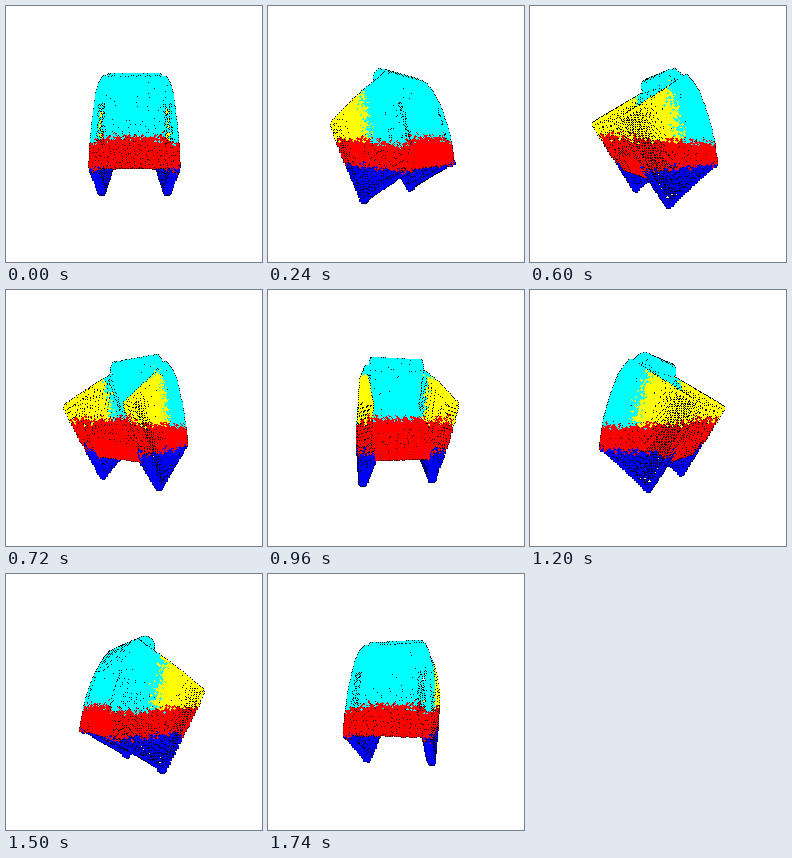
Write a matplotlib script that moves like this. It is 256 px wide and 256 px high and loops after 1.8 s.

```python
import numpy as np
import matplotlib.pyplot as plt
from matplotlib.animation import FuncAnimation

SIZE, FRAMES, INTERVAL = 256, 30, 60
CAMERA = 240
PITCH = np.radians(32)
TOP = 85
CYAN, YELLOW, RED, BLUE = (0, 255, 255), (255, 255, 0), (255, 0, 0), (0, 0, 255)
rng = np.random.default_rng(4)


# Chair space: x across, h up from the base, b backwards from the front plane.
def shell(h):
    """Backrest depth at height h."""
    return 63 + 0.5 * h - 0.0033 * h**2


def outer(h, b):
    """Half width of the body, narrowing at the shoulders."""
    flare = 3 * np.minimum(h / 60, 1) * (1 - b / 40)
    shoulder = np.clip((h - 66) / 19, 0, 1)**1.5 * np.clip((b - 45) / 33, 0, 1)
    return 37 + flare - 5 * shoulder


def inner(h):
    """Inside face of a side panel."""
    return np.where(h < 46, np.maximum(31 - 0.23 * h, 24), 30)


def patch(n, surface, mirror=False):
    """Spread n points evenly over a surface of (u, v)."""
    i = np.arange(n)
    u = (rng.random() + 0.7548777 * i) % 1
    v = (rng.random() + 0.5698403 * i) % 1
    pts = np.stack(np.broadcast_arrays(*surface(u, v)), 1).astype(float)
    if mirror:
        pts = np.vstack([pts, pts * (-1, 1, 1)])
    return pts


def side(u, v):
    h = TOP * v**0.78
    b = shell(h) * u**0.68
    return outer(h, b), h, b


def inside(u, v):
    h = (TOP - 1) * v**0.85
    return inner(h), h, 57 * u


def rim(h, b, u):
    near, far = np.minimum(inner(h), outer(h, b) - 3), outer(h, b)
    return near + (far - near) * u, h, b


def back(u, v):
    h = TOP * v
    return outer(h, shell(h)) * (2 * u - 1), h, shell(h)


def roll(u, v):
    a = 2 * np.pi * v
    return 50 * u - 25, 87.5 + 9 * np.sin(a), 70 + 8.5 * np.cos(a)


def roll_end(u, v):
    a, r = 2 * np.pi * v, np.sqrt(u)
    return 25 + 0 * u, 87.5 + 9 * r * np.sin(a), 70 + 8.5 * r * np.cos(a)


def foot(b):
    def ring(u, v):
        a = 2 * np.pi * u
        return 34 + 2.5 * np.cos(a), -2 * v, b + 2.5 * np.sin(a)
    return ring


def build():
    rear = patch(3000, back)
    x, h = np.abs(rear[:, 0]), rear[:, 1]
    slit = (x > 25.5) & (x < 32) & (h > 18) & (h < 54)
    rear = rear[~slit | (rng.random(len(rear)) > 0.75)]
    parts = [
        rear,
        patch(1900, side, True),
        patch(900, inside, True),
        patch(300, lambda u, v: rim(TOP * v, 0 * v, u), True),
        patch(170, lambda u, v: rim(0 * v, 63 * v, u), True),
        patch(320, lambda u, v: rim(TOP + 0 * v, 80 * v, u), True),
        patch(800, lambda u, v: (52 * u - 26, 45 + 40 * v, 56 + 4 * v)),
        patch(500, lambda u, v: (58 * u - 29, TOP, 59 + 22 * v)),
        patch(900, roll),
        patch(80, roll_end, True),
        patch(800, lambda u, v: (58 * u - 29, 46, 57 * v)),
        patch(500, lambda u, v: (52 * u - 26, 29 + 17 * v, 0)),
        patch(500, lambda u, v: (48 * u - 24, 29, 60 * v)),
        patch(20, foot(2), True),
        patch(20, foot(62), True),
    ]
    x, h, b = np.vstack(parts).T
    c, s = np.cos(PITCH), np.sin(PITCH)
    return x, -61 + c * h + s * b, -10.5 - s * h + c * b


def paint(x, y, z):
    """Label by height, and by depth in the upper part."""
    width = np.abs(x)
    mid = width < 25
    blur = rng.normal(0, 2.2, len(x))
    seat_top = -6 - 0.06 * z + 6 * np.clip((36 - width) / 12, 0, 1) + blur
    seat_low = np.where(mid, -42, -29) + blur
    rgb = np.empty((len(x), 3), np.uint8)
    rgb[:] = CYAN
    rgb[~mid & (z < -0.24 * y + 2 * blur)] = YELLOW
    rgb[y < seat_top] = RED
    rgb[y < seat_low] = BLUE
    return rgb


X, Y, Z = build()
COLOR = paint(X, Y, Z)
BALL = [(i, j) for i in (-1, 0, 1) for j in (-1, 0, 1)]


def render(k):
    a = 2 * np.pi * k / FRAMES
    c, s = np.cos(a), np.sin(a)
    depth = Z * c - X * s
    scale = CAMERA / (CAMERA - depth)
    px = np.rint(128 + (X * c + Z * s) * scale).astype(int)
    py = np.rint(128 - Y * scale).astype(int)
    cols, rows, near, rgb = [], [], [], []
    for i, j in BALL:
        corner = i != 0 and j != 0
        cols.append(px + i)
        rows.append(py + j)
        near.append(depth + (0 if corner else 3))
        rgb.append(COLOR * 0 if corner else COLOR)
    order = np.argsort(np.concatenate(near), kind="stable")
    img = np.full((SIZE, SIZE, 3), 255, np.uint8)
    img[np.concatenate(rows)[order], np.concatenate(cols)[order]] = np.concatenate(rgb)[order]
    return img


fig = plt.figure(figsize=(2.56, 2.56), dpi=100, facecolor="white")
ax = fig.add_axes([0, 0, 1, 1])
ax.axis("off")
view = ax.imshow(render(0), interpolation="nearest", aspect="auto")


def update(k):
    view.set_data(render(k))
    return [view]


anim = FuncAnimation(fig, update, frames=FRAMES, interval=INTERVAL,
                     repeat=True, repeat_delay=0, blit=False)
plt.show()
```
